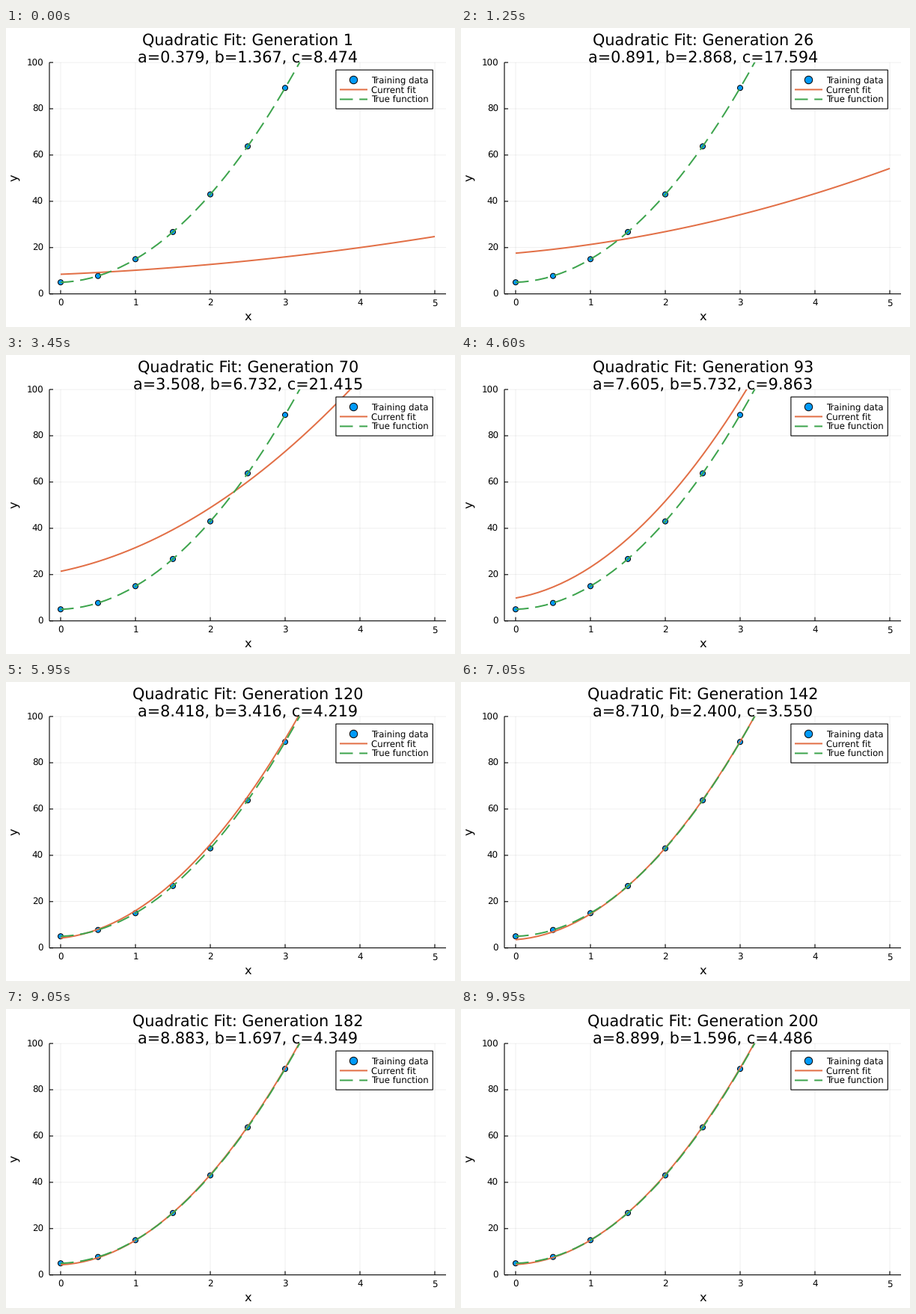
These frames come from a looping animation (600 px wide and 400 px high, 10 s). A matplotlib script:

```python
import numpy as np
import matplotlib.pyplot as plt
from matplotlib.animation import FuncAnimation
from matplotlib.patches import Circle, Rectangle

plt.rcParams["font.family"] = "DejaVu Sans"
plt.rcParams["text.hinting"] = "none"

W, H, DPI = 600, 400, 100
PX = 72 / DPI  # points per pixel
GENERATIONS = 200
LEFT, RIGHT, TOP, BOTTOM = 58, 588, 46.1, 355.7
BLUE, ORANGE, GREEN = "#009AF9", "#E26F46", "#3DA44D"
DASHED = dict(ls=(0, (8.75, 4.35)), dash_capstyle="butt")
TRUE = (9, 1, 5)

# Key generations of the search: generation, a, b, c
KEYS = np.array([
    (1, 0.379, 1.367, 8.474),
    (26, 0.891, 2.868, 17.594),
    (48, 1.988, 5.227, 31.369),
    (64, 2.86, 6.8, 24.8),
    (93, 7.605, 5.732, 9.863),
    (120, 8.418, 3.416, 4.219),
    (142, 8.71, 2.4, 3.55),
    (164, 8.859, 1.837, 4.172),
    (200, 8.899, 1.596, 4.486),
])


def smooth(t, v, g):
    """Monotone cubic through the points (t, v), evaluated at g."""
    h = np.diff(t)
    s = np.diff(v) / h
    prod, total = s[:-1] * s[1:], s[:-1] + s[1:]
    inner = 2 * np.maximum(prod, 0) / np.where(prod > 0, total, 1)
    m = np.r_[s[0], inner, s[-1]]
    i = np.clip(np.searchsorted(t, g, side="right") - 1, 0, len(h) - 1)
    u = (g - t[i]) / h[i]
    rise = u * u * (3 - 2 * u)
    return (v[i] + rise * (v[i + 1] - v[i])
            + h[i] * u * (1 - u) * ((1 - u) * m[i] - u * m[i + 1]))


# The search moves in relative steps, so interpolate logarithms
gens = np.arange(1, GENERATIONS + 1)
A, B, C = (np.exp(smooth(KEYS[:, 0], np.log(col), gens))
           for col in KEYS[:, 1:].T)


def to_px(x):
    return 73 + 100 * x


def to_py(y):
    return BOTTOM - (BOTTOM - TOP) / 100 * y


def quadratic(x, a, b, c):
    return a * x**2 + b * x + c


fig = plt.figure(figsize=(W / DPI, H / DPI), dpi=DPI, facecolor="white")
ax = fig.add_axes([0, 0, 1, 1])
ax.set_xlim(0, W)
ax.set_ylim(H, 0)
ax.axis("off")
clip = Rectangle((LEFT, TOP), RIGHT - LEFT, BOTTOM - TOP,
                 transform=ax.transData)


def line(x, y, color="black", width=1.1, **kw):
    return ax.plot(x, y, color=color, lw=width * PX, snap=False,
                   solid_capstyle="butt", **kw)[0]


def label(x, y, s, size, ha="center", **kw):
    return ax.text(x, y, s, fontsize=size * PX, ha=ha, va="baseline", **kw)


# Grid, axes and ticks
for k in range(6):
    x, y = to_px(k), to_py(20 * k)
    line([x, x], [TOP, BOTTOM], width=0.6, alpha=0.1, zorder=1)
    line([LEFT, RIGHT], [y, y], width=0.6, alpha=0.1, zorder=1)
    line([x, x], [BOTTOM, BOTTOM - 5], zorder=2)
    line([LEFT, LEFT + 5], [y, y], zorder=2)
    label(x, 371.4, str(k), 11.85)
    label(50, y + 4.3, str(20 * k), 11.85, ha="right")
line([LEFT, RIGHT], [BOTTOM, BOTTOM], zorder=2)
line([LEFT, LEFT], [TOP, BOTTOM], zorder=2)
label(323, 391.4, "x", 16.3)
label(16.4, 200.6, "y", 16.3, rotation=90, rotation_mode="anchor")

# Data and curves
xs = np.linspace(0, 5, 51)
for x in np.arange(0, 3.5, 0.5):
    ax.add_patch(Circle((to_px(x), to_py(quadratic(x, *TRUE))), 3.5,
                        fc=BLUE, ec="black", lw=PX, zorder=3))
fit = line(to_px(xs), to_py(xs), ORANGE, 2, zorder=4)
true = line(to_px(xs), to_py(quadratic(xs, *TRUE)), GREEN, 2,
            zorder=5, **DASHED)
for curve in (fit, true):
    curve.set_clip_path(clip)

# Legend, built at the right and shifted when needed
frame = Rectangle((440.9, 56.1), 129.4, 52, fc="white", ec="black",
                  lw=1.1 * PX, snap=False, zorder=6)
dot = Circle((464.5, 69.5), 5.2, fc=BLUE, ec="black", lw=PX, zorder=7)
ax.add_patch(frame)
ax.add_patch(dot)
samples = [
    line([446, 483], [82.4, 82.4], ORANGE, 2, zorder=7),
    line([446, 483], [95.4, 95.4], GREEN, 2, zorder=7, **DASHED),
]
names = [
    label(488, 73.6 + 12.8 * k, s, 11.73, ha="left", zorder=7)
    for k, s in enumerate(["Training data", "Current fit", "True function"])
]

title = label(323.5, 23.3, "", 20.75, zorder=8)
params = label(323.5, 46.3, "", 20.75, zorder=8)


def place_legend(shift):
    frame.set_x(440.9 + shift)
    dot.set_center((464.5 + shift, 69.5))
    for s in samples:
        s.set_xdata([446 + shift, 483 + shift])
    for n in names:
        n.set_x(488 + shift)


def update(i):
    a, b, c = A[i], B[i], C[i]
    ys = quadratic(xs, a, b, c)
    fit.set_ydata(to_py(ys))
    # The legend avoids the top right corner while the fit crosses it
    crowded = np.any((xs > 4.05) & (ys > 78) & (ys <= 100))
    place_legend(-365 if crowded else 0)
    title.set_text(f"Quadratic Fit: Generation {i + 1}")
    params.set_text(f"a={a:.3f}, b={b:.3f}, c={c:.3f}")
    return [fit, title, params, frame, dot, *samples, *names]


anim = FuncAnimation(fig, update, frames=GENERATIONS, interval=50,
                     repeat=True, repeat_delay=0)
plt.show()
```
